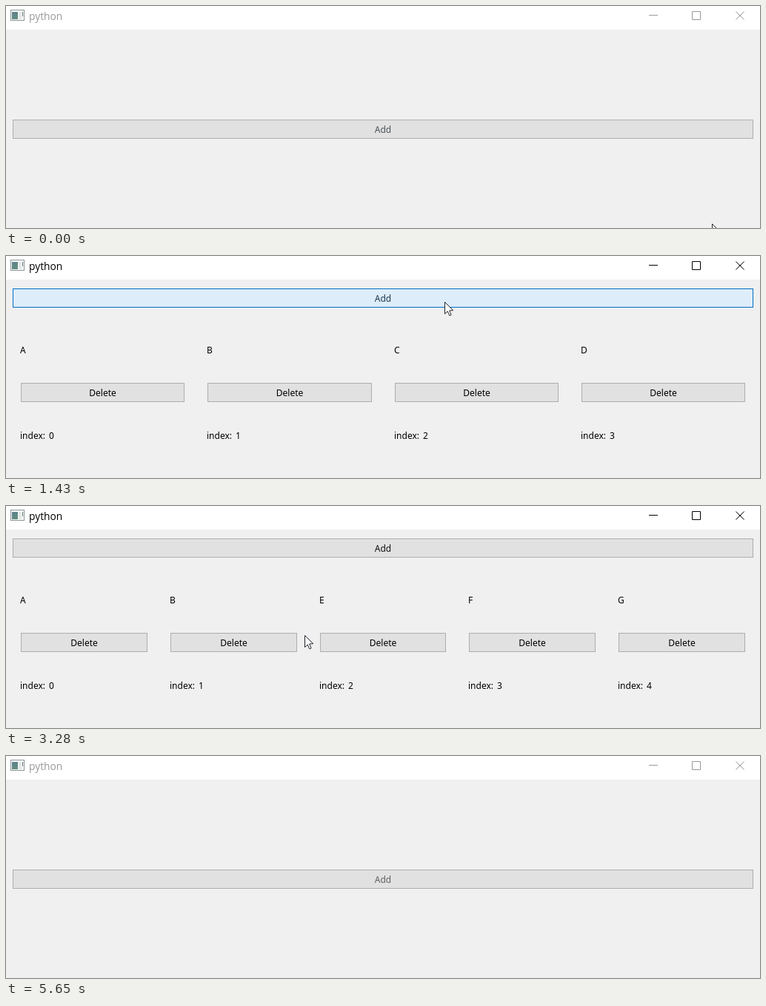
An HTML page with a canvas that plays this animation: 1018 px wide and 301 px high, repeating every 5.68 s.

```html
<!DOCTYPE html>
<html lang="en">
<head>
<meta charset="utf-8">
<title>python</title>
<style>
  html, body { margin: 0; width: 100%; height: 100%; overflow: hidden; background: #f0f0f0; }
  canvas { display: block; }
</style>
</head>
<body>
<canvas id="stage" width="1018" height="301"></canvas>
<script>
const ctx = document.getElementById('stage').getContext('2d');
const LOOP = 5680;
const FADE = 100;
const UI_FONT = '12px "Noto Sans", "Open Sans", sans-serif';
const TITLE_FONT = '13.8px "Open Sans", "Noto Sans", sans-serif';

// Button looks: fill and border as RGB
const IDLE = { fill: [225, 225, 225], border: [173, 173, 173] };
const HOVER = { fill: [229, 241, 251], border: [0, 120, 215] };
const PRESS = { fill: [204, 228, 247], border: [0, 84, 153] };

// When each item is added and deleted
const items = {
  A: [560, 3970], B: [1060, 4130], C: [1250, 2810], D: [1360, 3110],
  E: [1540, 4410], F: [1670, 4640], G: [1880, 4890]
};

const click = (down, up) => [[down, PRESS], [up, HOVER]];
const looks = {
  Add: [[270, HOVER], [470, PRESS], [560, IDLE], [900, HOVER],
    ...click(980, 1060), ...click(1220, 1250), ...click(1320, 1360),
    ...click(1490, 1540), ...click(1620, 1670), ...click(1830, 1880),
    [2270, IDLE], [4890, HOVER], [5040, IDLE]],
  A: [[3665, HOVER], [3920, PRESS]],
  B: [[3480, HOVER], [3615, IDLE], [3970, HOVER], [4080, PRESS]],
  C: [[2490, HOVER], [2780, PRESS]],
  D: [[2810, HOVER], [3080, PRESS]],
  E: [[4130, HOVER], [4360, PRESS]],
  F: [[4410, HOVER], [4590, PRESS]],
  G: [[4640, HOVER], [4850, PRESS]]
};

const easeOut = u => 1 - (1 - u) ** 2;
const linear = u => u;

// Pointer moves: start, end, from, to, easing
const moves = [
  [0, 400, [953, 296], [876, 167], easeOut],
  [680, 990, [876, 167], [592, 62], easeOut],
  [2250, 2600, [592, 62], [403, 175], easeOut],
  [3470, 3900, [403, 175], [85, 178], easeOut],
  [5020, 5590, [85, 178], [930, 303], linear]
];

const clamp = u => Math.max(0, Math.min(1, u));
const mix = (a, b, u) => a.map((v, i) => v + (b[i] - v) * u);
const rgb = c => `rgb(${c.map(Math.round).join(',')})`;

function lookAt(name, t) {
  let look = IDLE;
  for (const [start, next] of looks[name]) {
    if (t < start) break;
    const u = clamp((t - start) / FADE);
    look = {
      fill: mix(look.fill, next.fill, u),
      border: mix(look.border, next.border, u)
    };
  }
  return look;
}

function text(str, x, y, color = '#000', align = 'left', font = UI_FONT) {
  ctx.font = font;
  ctx.textAlign = align;
  ctx.fillStyle = color;
  ctx.fillText(str, x, y);
}

function box(x, y, w, h, fill, border) {
  ctx.fillStyle = border;
  ctx.fillRect(x, y, w, h);
  ctx.fillStyle = fill;
  ctx.fillRect(x + 1, y + 1, w - 2, h - 2);
}

function button(label, left, right, top, look, color) {
  box(left, top, right - left, 26, rgb(look.fill), rgb(look.border));
  text(label, (left + right) / 2, top + 18, color, 'center');
}

function titleBar(active) {
  const ink = active ? '#000' : '#999';
  ctx.fillStyle = '#fff';
  ctx.fillRect(0, 0, 1018, 32);

  box(6, 5, 19, 15, '#fafafa', '#8b9494');
  const teal = ctx.createLinearGradient(8, 8, 16, 18);
  teal.addColorStop(0, '#5d8290');
  teal.addColorStop(1, '#648f7c');
  ctx.fillStyle = teal;
  ctx.fillRect(8, 8, 8, 10);
  ctx.fillStyle = '#e4e8e8';
  ctx.fillRect(17, 8, 4, 10);
  ctx.fillStyle = '#627474';
  ctx.fillRect(22, 8, 1, 6);

  text('python', 31, 19, ink, 'left', TITLE_FONT);
  ctx.strokeStyle = ink;
  ctx.lineWidth = 1;
  ctx.beginPath();
  ctx.moveTo(868, 12.5);
  ctx.lineTo(880, 12.5);
  ctx.rect(926.5, 7.5, 11, 11);
  ctx.moveTo(985.5, 7.5);
  ctx.lineTo(996.5, 18.5);
  ctx.moveTo(996.5, 7.5);
  ctx.lineTo(985.5, 18.5);
  ctx.stroke();
}

function addTextColor(t) {
  if (t < 1100) return '#4c5257';
  if (t < 2250) return '#1c3a52';
  return t < 4890 ? '#111' : '#606060';
}

function pointer(t) {
  let pos = moves[0][2];
  for (const [start, end, from, to, ease] of moves) {
    if (t >= start) pos = mix(from, to, ease(clamp((t - start) / (end - start))));
  }
  const [x, y] = pos.map(Math.round);
  if (y > 301) return;
  ctx.save();
  ctx.translate(x + 0.5, y + 0.5);
  ctx.beginPath();
  ctx.moveTo(0, 0);
  for (const p of [[0, 16], [3.7, 12.5], [6.3, 18.3], [8.6, 17.3], [6.2, 11.5], [11.2, 11.2]]) {
    ctx.lineTo(...p);
  }
  ctx.closePath();
  ctx.fillStyle = '#fff';
  ctx.fill();
  ctx.strokeStyle = '#20242c';
  ctx.stroke();
  ctx.restore();
}

function draw(t) {
  ctx.fillStyle = '#f0f0f0';
  ctx.fillRect(0, 0, 1018, 301);
  titleBar(t >= 470 && t < 5620);

  const shown = Object.keys(items).filter(k => t >= items[k][0] && t < items[k][1]);
  button('Add', 9, 1009, shown.length ? 44 : 154, lookAt('Add', t), addTextColor(t));

  const pitch = 1009 / shown.length;
  shown.forEach((name, i) => {
    const left = Math.round(20 + pitch * i);
    const right = Math.round(20 + pitch * (i + 1) - 31);
    text(name, left - 1, 132);
    button('Delete', left, right, 172, lookAt(name, t));
    text('index:', left - 1, 248);
    text(i, left + 38, 248);
  });
  pointer(t);
}

const begin = performance.now();
function tick() {
  draw((performance.now() - begin) % LOOP);
  requestAnimationFrame(tick);
}
tick();
</script>
</body>
</html>
```
